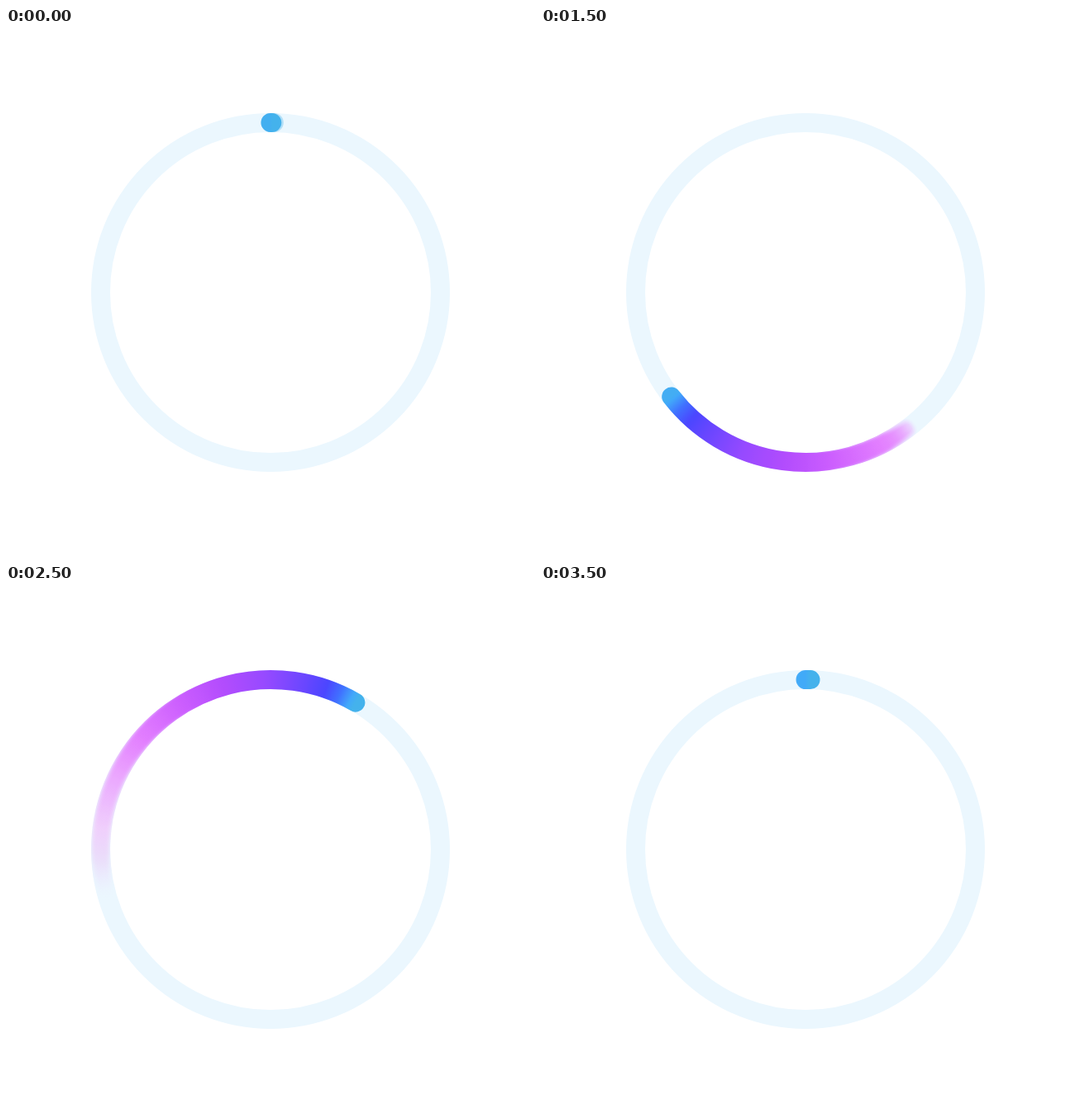
These frames come from a looping animation (640x640 px, 3.57 s). An HTML page with a canvas:

```html
<!DOCTYPE html>
<html lang="en">
<head>
<meta charset="utf-8">
<title>Ring loader</title>
<style>
  html, body { margin: 0; width: 100%; height: 100%; overflow: hidden; background: #fff; }
  canvas { display: block; width: 100vmin; height: 100vmin; margin: auto; }
</style>
</head>
<body>
<canvas id="stage" width="640" height="640"></canvas>
<script>
const ctx = document.getElementById('stage').getContext('2d');
const LOOP = 3570, STEPS = 50;
const MID = 320, RADIUS = 205.5, WIDTH = 23;
const TURN_STEP = 39, OVERSHOOT = 58;

// Degrees behind the head, then the colour there
const shades = [
  [0, 0x44b2ec], [2, 0x41a8fa], [6, 0x4070ff], [11, 0x4b46ff], [18, 0x6846ff],
  [25, 0x8048ff], [32, 0x974aff], [46, 0xb24cfd], [61, 0xcb5dfe], [79, 0xe27eff],
  [96, 0xeba6fe], [113, 0xf0cdfb], [124, 0xeadcfa], [137, 0xebf7fe]
];

// Step, then the angle of the tail
const tailKeys = [[0, 0], [8, 12.2], [16, 58.3], [25, 248], [32, 545], [39, 676], [47, 720], [50, 720]];

const clamp = (v, lo = 0, hi = 1) => Math.min(hi, Math.max(lo, v));
const rad = deg => (deg - 90) * Math.PI / 180;

function bezier(x, x1, y1, x2, y2) {
  const at = (s, a, b) => 3 * a * s * (1 - s) ** 2 + 3 * b * s * s * (1 - s) + s ** 3;
  let lo = 0, hi = 1;
  for (let i = 0; i < 30; i++) {
    const s = (lo + hi) / 2;
    if (at(s, x1, x2) < x) lo = s; else hi = s;
  }
  return at(lo, y1, y2);
}

// Monotone cubic through the keys
function smooth(keys, x) {
  const last = keys.length - 1;
  const slope = i => (keys[i + 1][1] - keys[i][1]) / (keys[i + 1][0] - keys[i][0]);
  const tangent = i => {
    if (i === 0 || i === last) return 0;
    const a = slope(i - 1), b = slope(i);
    return a * b > 0 ? 2 * a * b / (a + b) : 0;
  };
  let i = 0;
  while (i < last - 1 && x > keys[i + 1][0]) i++;
  const [x0, y0] = keys[i], [x1, y1] = keys[i + 1];
  const h = x1 - x0, u = (x - x0) / h;
  return y0 + (y1 - y0) * u * u * (3 - 2 * u)
    + h * u * (1 - u) * (tangent(i) * (1 - u) - tangent(i + 1) * u);
}

// Two turns with an overshoot, then a soft swing back to the top
function headAngle(k) {
  if (k <= TURN_STEP) {
    return 0.5 + (720 + OVERSHOOT) * bezier(k / TURN_STEP, 0.737, 0, 0.66, 1);
  }
  const u = (STEPS - k) / (STEPS - TURN_STEP);
  return 720.5 + OVERSHOOT / 2 * (1 - Math.cos(Math.PI * u));
}

function shade(off, alpha) {
  const d = clamp(off, 0, 137);
  let i = 0;
  while (i < shades.length - 2 && d > shades[i + 1][0]) i++;
  const [d0, c0] = shades[i], [d1, c1] = shades[i + 1];
  const u = (d - d0) / (d1 - d0);
  const rgb = [16, 8, 0].map(s => {
    const a = c0 >> s & 255, b = c1 >> s & 255;
    return Math.round(a + (b - a) * u);
  });
  return `rgba(${rgb},${alpha.toFixed(3)})`;
}

function arc(from, to, style, width) {
  ctx.strokeStyle = style;
  ctx.lineWidth = width;
  ctx.beginPath();
  ctx.arc(MID, MID, RADIUS, rad(from), rad(to));
  ctx.stroke();
}

function trailPaint(tail, head, lead) {
  const start = tail - 60, span = head - tail;
  const strength = clamp(span / 50), soft = 3.2 + span * 0.1;
  const paint = ctx.createConicGradient(rad(start), MID, MID);
  const count = Math.ceil(span + 8);
  for (let i = 0; i <= count; i++) {
    const a = tail - 4 + (span + 8) * i / count;
    const off = head + lead - clamp(a, tail, head);
    const ramp = clamp((a - tail + 3.2) / soft);
    const body = 1 - 0.55 * clamp((off - 55) / 40);
    paint.addColorStop((a - start) / 360, shade(off, body * (1 - strength * (1 - ramp))));
  }
  return paint;
}

function draw(k) {
  const head = headAngle(k);
  const tail = Math.min(smooth(tailKeys, k), head - 0.1);
  const lead = 4.5 * Math.exp(-(((k - 16) / 4) ** 2));

  ctx.clearRect(0, 0, 640, 640);
  ctx.lineCap = 'butt';
  arc(0, 360, '#ebf7fe', WIDTH);

  ctx.lineCap = 'round';
  if (k < 1) arc(0, 1.2, shade(0, 0.35), WIDTH);
  const paint = trailPaint(tail, head, lead);
  // Nested strokes give the pale end its soft edges
  for (let w = WIDTH; w > 10; w -= 3) arc(tail, head, paint, w);
}

const begin = performance.now();
function tick() {
  const t = (performance.now() - begin) % LOOP;
  draw(Math.floor(t / LOOP * STEPS + 0.07) % STEPS);
  requestAnimationFrame(tick);
}
tick();
</script>
</body>
</html>
```
